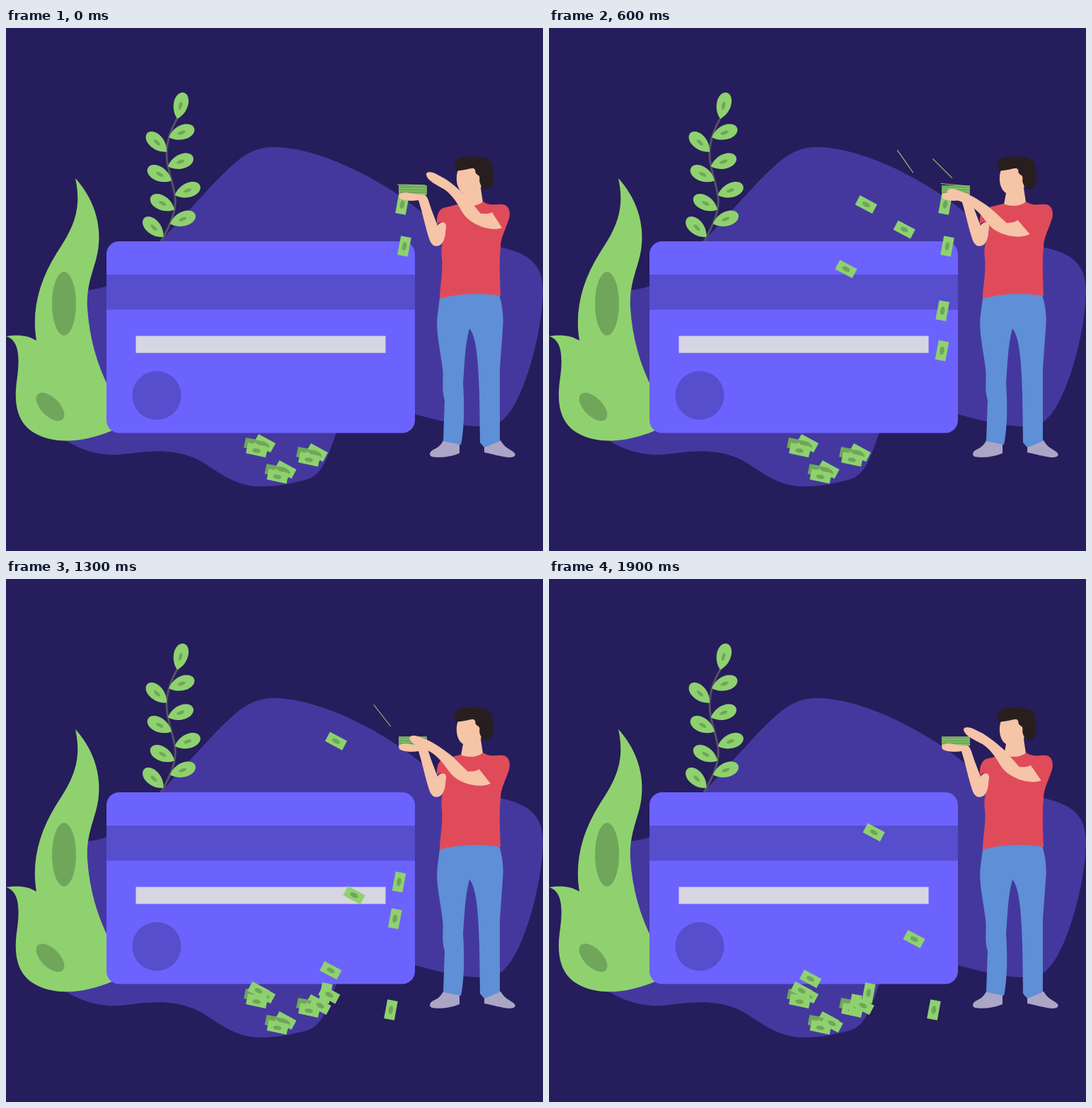
An HTML page for the animation above (2 s loop, 759 by 738 pixels).

```html
<!DOCTYPE html>
<html lang="en">
<head>
<meta charset="utf-8">
<title>Raining money</title>
<style>
  html, body { margin: 0; width: 100%; height: 100%; overflow: hidden; background: #261d5c; }
  svg { display: block; width: 100vw; height: 100vh; }
  .light { fill: #8fd16f; }
  .dark { fill: #70a65a; }
  .skin { fill: #f6c4a7; }
  .shade { fill: #564ecc; }
  .streak { stroke: #8fd16f; stroke-width: 1.1; }
</style>
</head>
<body>
<svg viewBox="0 0 759 738" preserveAspectRatio="none">
  <defs>
    <g id="bill">
      <rect class="light" x="-13.7" y="-7.4" width="27.4" height="14.8"/>
      <ellipse class="dark" rx="6" ry="3.2"/>
    </g>
    <g id="leaf">
      <path class="light" d="M0 0C7-8 17-11 26-10C33-9 38-5 38 0C38 5 33 9 26 10C17 11 7 8 0 0Z"/>
      <ellipse class="dark" cx="19" rx="5.8" ry="2.4"/>
    </g>
    <g id="pile">
      <path class="dark" d="M339 578L372 584L369 599L336 592Z"/>
      <path class="light" d="M357 573L381 586L374 599L349 587Z"/>
      <path class="dark" d="M351 581L363 583C369 585 373 589 372 592L367 593L350 589Z"/>
      <path class="light" d="M342 585L351 587L352 584L356 588L370 591L367 606L339 600Z"/>
      <ellipse class="dark" cx="354" cy="596.3" rx="6" ry="3" transform="rotate(10 354 596.3)"/>
    </g>
    <path id="toss" d="M573 221.5C588 200 545 194 494 187"/>
    <path id="drop" d="M560 249L555 447L544 608"/>
    <path id="drift" d="M563 308C563 400 563 460 537 512C520 545 470 565 433 600"/>
    <path id="left" d="M497 203C470 222 418 270 418 322C418 365 450 390 450 440C450 490 380 545 357 581"/>
    <path id="right" d="M500 212C498 235 500 262 502 280C503 335 536 365 538 435C538 500 482 555 444 602"/>
    <path id="middle" d="M494 215C482 240 459 310 459 365C459 400 492 405 492 445C492 505 463 560 400 627"/>
  </defs>

  <path fill="#44389f" d="M115 370C160 367 185 335 222 297L292 221C325 187 345 168 378 168C440 168 530 212 590 262C640 300 690 306 702 310C735 318 759 330 759 372C757 440 730 525 706 549C690 571 640 562 578 545C520 530 480 540 467 571C455 602 449 632 422 638C400 643 385 647 360 647C315 647 290 615 262 605C215 588 170 605 145 602C120 600 100 592 85 582Z"/>

  <path id="stem" fill="none" stroke="#555066" stroke-width="3" d="M243 126C234 141 227 157 227 178C227 200 236 216 239 238C241 258 233 277 219 301"/>
  <g id="leaves"></g>

  <path class="light" d="M98 212C122 238 134 272 131 305C129 335 113 355 115 395C118 440 130 480 150 516V568C110 585 72 587 45 574C15 560 10 530 16 492C20 460 17 440 0 435C17 432 32 434 43 441C36 400 46 358 72 317C94 284 108 257 98 212Z"/>
  <ellipse class="dark" cx="82" cy="389" rx="17" ry="45"/>
  <ellipse class="dark" cx="62.5" cy="534.5" rx="25" ry="13" transform="rotate(45 62.5 534.5)"/>

  <rect x="142" y="301" width="436" height="270.5" rx="18" fill="#6c63ff"/>
  <rect class="shade" x="142" y="348" width="436" height="49.5"/>
  <rect x="183.5" y="434.5" width="353" height="24" fill="#d6d6e3"/>
  <circle class="shade" cx="213" cy="518.5" r="34.5"/>

  <use href="#pile"/>
  <use href="#pile" x="74" y="13"/>
  <use href="#pile" x="29.5" y="37"/>
  <g id="money"></g>

  <g fill="#aba6c5">
    <path d="M618 582C627 581 635 584 641 587V600C630 605 612 607 602 605C597 603 599 597 604 595C611 592 615 588 618 582Z"/>
    <path d="M676 590C683 588 690 582 699 582C704 591 711 594 717 598C723 603 718 606 711 606C700 605 687 601 676 599Z"/>
  </g>
  <path fill="#5f8fd6" d="M613 381C635 373 670 373 697 376C701 390 704 405 702 425L698 480V583L676 592L670 585C669 520 670 440 655 424C648 450 648 480 646 500C648 530 648 565 643 588L618 583L620 525C615 510 619 495 617 480C613 450 607 425 610 405Z"/>
  <path class="skin" d="M638 203C635 215 638 228 646 233L643 249C652 256 668 254 674 246L671 226C675 215 665 196 655 196C648 196 640 198 638 203Z"/>
  <path fill="#e04b5a" d="M609 277C608 262 613 254 622 253L642 248C655 253 668 251 674 245L680 248C690 251 698 247 706 250C713 254 713 265 710 272C705 287 699 296 699 310C697 330 698 355 699 378C670 373 635 375 613 382C613 365 618 345 616 325C613 305 622 293 622 283C622 273 614 272 609 277Z"/>
  <path fill="#281e1d" d="M634 197C635 185 640 181 652 182C665 180 681 182 686 190C690 202 690 217 685 225C680 230 672 226 670 219C668 214 671 211 668 208C664 206 662 203 664 198C656 197 648 202 636 201Z"/>
  <rect class="dark" x="555" y="222.5" width="40" height="13"/>
  <path stroke="#8fd16f" stroke-width=".9" d="M555 223H595M555 226.5H595M555 230H595M555 233.5H595"/>
  <path class="skin" d="M555 236C557 232 566 231 575 234L592 235C597 240 598 247 602 258L610 279C614 272 623 273 622 281C621 292 620 304 612 307C605 310 600 304 598 297C593 282 588 258 583 243C572 245 560 243 556 240Z"/>
  <path id="arm" class="skin" d="M594 206C595 202 602 203 608 206L621 213C634 222 643 230 651 238C658 246 665 255 671 262C677 262 682 263 687 260L701 282C688 287 668 281 655 271C646 264 643 256 638 248C633 240 627 233 620 228C610 222 594 215 594 206Z"/>
</svg>
<script>
const LOOP = 2000, STEP = 100, TOSS = 300, FLIGHT = 715, EASE = 1.13;

const byId = id => document.getElementById(id);

function add(parent, tag, attrs) {
  const node = document.createElementNS("http://www.w3.org/2000/svg", tag);
  for (const name in attrs) node.setAttribute(name, attrs[name]);
  return byId(parent).appendChild(node);
}

function along(id, progress) {
  const path = byId(id);
  return path.getPointAtLength(path.getTotalLength() * Math.min(1, Math.max(0, progress)));
}

const place = ({ x, y }, angle) => `translate(${x} ${y}) rotate(${angle})`;

function show(node, visible, point, angle) {
  node.setAttribute("visibility", visible ? "visible" : "hidden");
  node.setAttribute("transform", place(point, angle));
}

// One leaf on top, then leaves on alternating sides of the stem.
const addLeaf = (point, angle) => add("leaves", "use", { href: "#leaf", transform: place(point, angle) });
addLeaf({ x: 242, y: 128 }, -76);
for (let i = 0; i < 8; i++) {
  const angle = i % 2 ? -136 - 18 * Math.sin(Math.PI * (i - 1) / 6) : -20;
  addLeaf(byId("stem").getPointAtLength(31 + 20.8 * i), angle);
}

const newBill = () => add("money", "use", { href: "#bill" });

const falling = [0, 600].flatMap(start => [
  { start, route: "drop", duration: 1300, ease: EASE, stays: false, bill: newBill() },
  { start, route: "drift", duration: 1400, ease: 1, stays: true, bill: newBill() }
]);

const waves = [0, 165, 915];
const offsets = { left: 0, right: 150, middle: 420 };
const thrown = waves.flatMap(wave => Object.keys(offsets).map(route => ({
  route,
  start: wave + offsets[route],
  bill: newBill(),
  streak: add("money", "line", { class: "streak", x1: -19.5, x2: 19.5 })
})));

function draw(now) {
  const t = Math.floor(now % LOOP / STEP) * STEP;

  for (const { start, route, duration, ease, stays, bill } of falling) {
    const age = t - start;
    const progress = Math.max(0, age / duration) ** ease;
    show(bill, age >= 0 && (stays || age <= duration), along(route, progress), 100.5);
  }

  // A note leaves the stack edge-on, then turns flat and flutters down.
  for (const { start, route, bill, streak } of thrown) {
    const age = t - start;
    const lift = age / TOSS;
    const fall = Math.max(0, (age - TOSS) / FLIGHT) ** EASE;
    show(streak, lift >= 0 && lift < 1, along("toss", lift ** 2), 1 + 54 * Math.sin(lift * Math.PI / 2));
    show(bill, lift >= 1, along(route, fall), 28);
  }

  const swing = 1 - Math.abs(t % 1000 / 500 - 1);
  byId("arm").setAttribute("transform",
    `translate(${-27 * swing} ${11 * swing}) rotate(${-10 * swing} 701 282)`);
}

let origin;
function tick(now) {
  origin ??= now;
  draw(now - origin);
  requestAnimationFrame(tick);
}
draw(0);
requestAnimationFrame(tick);
</script>
</body>
</html>
```
